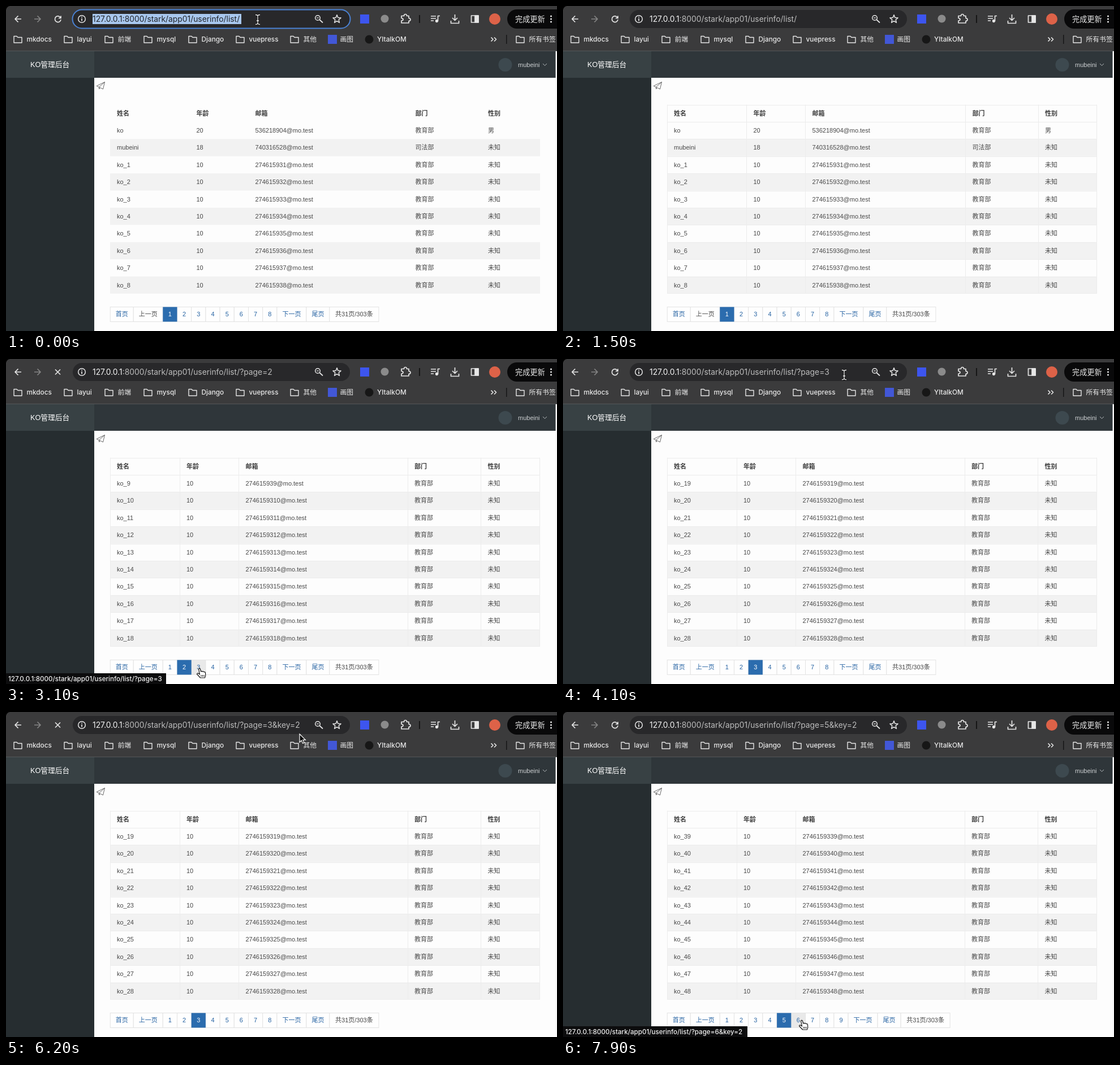
An HTML page that plays this animation: 974 px wide and 575 px high, repeating every 8 s.

```html
<!DOCTYPE html>
<html lang="zh-CN">
<head>
<meta charset="utf-8">
<title>Paged user list</title>
<style>
html, body { margin: 0; width: 100%; height: 100%; overflow: hidden; background: #fdfdfd; }
svg { display: block; width: 974px; height: 575px; }
text { font: 11px "Liberation Sans", "Noto Sans CJK SC", "Noto Sans CJK", sans-serif; fill: #484848; white-space: pre; }
.ui text { font: 500 11.8px Inter, "Noto Sans CJK SC", "Noto Sans CJK", sans-serif; fill: #e9e9e9; }
.ui .url { font-size: 13.85px; font-weight: 400; fill: #bdbdbd; }
.ui .url tspan { fill: #f4f4f4; }
.ui .picked, .ui .picked tspan { fill: #20242a; }
.ui .status { font-size: 11.6px; fill: #f2f2f2; }
.icon { fill: none; stroke: #e6e6e6; stroke-width: 1.7; stroke-linejoin: round; }
.head { font-weight: bold; fill: #3c3c3c; }
.mid { text-anchor: middle; }
.link { fill: #2562a2; }
.line { fill: none; stroke: #ececec; }
</style>
</head>
<body>
<svg viewBox="0 0 974 575">
  <rect width="974" height="80" fill="#3b3b3c"/>
  <path d="M0 0H7Q1 1 0 7Z"/>
  <rect y="79" width="974" height="1.5" fill="#555759"/>

  <g class="ui">
    <g class="icon">
      <path d="M27 23H16.500M21.500 17.500L16 23L21.500 28.500"/>
      <path d="M50 23H60.500M55.500 17.500L61 23L55.500 28.500" stroke="#858585"/>
    </g>
    <rect x="118" y="7" width="490" height="32" rx="16" fill="#28282a"/>
    <g id="bar"></g>
    <g class="icon">
      <circle cx="134" cy="23" r="6.300" stroke-width="1.500"/>
      <path d="M134 22V26.500M134 19V20.500"/>
      <circle cx="551" cy="21" r="4.300" stroke-width="1.500"/>
      <path d="M549 21H553" stroke-width="1.200"/>
      <path d="M554 24L560 29.500"/>
      <path id="star" stroke-width="1.500"/>
      <path d="M699 17.500H703.500Q703.500 14.500 706 14.500T708.500 17.500H712V21.500Q715 21.500 715 24T712 26.500V30H699V26Q702 26 702 23.800T699 21.500Z"/>
      <path d="M751 18H760M751 22H760M751 26H756M763.500 27V17.500H767"/>
      <circle cx="761.500" cy="26.500" r="1.800" fill="#e6e6e6"/>
      <path d="M793.500 15V25M789 21L793.500 25.500L798 21M786.500 26V30.500H800.500V26"/>
      <rect x="822.500" y="17" width="12.500" height="12"/>
      <path d="M829 17H835V29H829Z" fill="#e6e6e6"/>
      <path d="M857.500 55.500L861 59L857.500 62.500M863 55.500L866.500 59L863 62.500"/>
    </g>
    <rect x="626" y="15" width="16" height="16" fill="#3d55ee"/>
    <circle cx="669.500" cy="22.500" r="7" fill="#8b8b8b"/>
    <path d="M730 16h2v14h-2zM884 51h1.500v16h-1.500z" fill="#161616"/>
    <circle cx="864" cy="23" r="10" fill="#dd6248"/>
    <rect x="886" y="6" width="110" height="34" rx="17" fill="#09090a"/>
    <text x="900" y="28" style="font-size:13.200px">完成更新</text>
    <g fill="#eee"><circle cx="963.500" cy="18" r="1.500"/><circle cx="963.500" cy="23" r="1.500"/><circle cx="963.500" cy="28" r="1.500"/></g>
    <g id="marks"></g>
    <rect x="569" y="51" width="16" height="16" fill="#4257d6"/>
    <text x="590.500" y="63.300">画图</text>
    <circle cx="642" cy="59" r="7.500" fill="#171717"/>
    <text x="656" y="63.300">YItalkOM</text>
  </g>

  <rect y="80" width="974" height="47" fill="#2f363a"/>
  <rect y="80" width="156" height="47" fill="#384144"/>
  <rect y="127" width="156" height="448" fill="#262d30"/>
  <rect x="971.500" y="80" width="3" height="495" fill="#f6f6f6"/>
  <text x="43" y="108" style="font-size:12.700px;fill:#fff">KO管理后台</text>
  <circle cx="882.500" cy="104" r="12" fill="#3d494f"/>
  <text x="905" y="107.500" style="fill:#cdd0d2">mubeini</text>
  <path d="M949 102L952.500 105.500L956 102" fill="none" stroke="#b5babd"/>
  <path d="M160 141.500L174.500 134.500L171.500 147L166.500 144.500ZM174.500 134.500L164.500 143.500V147L166.500 144.500" fill="none" stroke="#686868"/>

  <g id="page"></g>
  <g id="status" class="ui"></g>
  <g id="cursor"></g>
</svg>
<script>
const $ = id => document.getElementById(id);
const PREFIX = '27461593', MAIL = '@mo.test', LIST = '/stark/app01/userinfo/list/';
const ROW = 30.4, TOP = 174.5;

const text = (x, y, s, cls = '') => `<text x="${x}" y="${y}" class="${cls}">${s}</text>`;
const rect = (x, y, w, h, attrs) => `<rect x="${x}" y="${y}" width="${w}" height="${h}" ${attrs}/>`;

$('star').setAttribute('d', 'M' + Array.from({ length: 10 }, (_, i) => {
  const a = (i / 5 - .5) * Math.PI, r = i % 2 ? 3.3 : 7.5;
  return [585 + r * Math.cos(a), 23.3 + r * Math.sin(a)].map(v => v.toFixed(1));
}).join('L') + 'Z');

$('marks').innerHTML = [[13, 'mkdocs'], [102, 'layui'], [174, '前端'], [243, 'mysql'], [322, 'Django'],
  [406, 'vuepress'], [502, '其他'], [901, '所有书签']].map(([x, name]) =>
  `<path class="icon" style="stroke-width:1.4" d="M${x + 1} 53.500h5l2 2h7v9.500h-14z"/>` + text(x + 23.5, 63.3, name)).join('');

// Address and status texts
const query = (page, key) => (page > 1 ? '?page=' + page : '') + key;
const address = q => `:8000${LIST}${q}`.replace('&', '&amp;');

function bar({ page, key, ring, picked, busy }) {
  const reload = busy ? 'M87 18.500L96 27.500M96 18.500L87 27.500'
    : 'M96.300 20.500A5.300 5.300 0 1 0 97 24M97 17.500V21.500H93';
  return `<path class="icon" d="${reload}"/>` +
    (ring ? rect(117.5, 6.5, 491, 33, 'rx="16.5" fill="none" stroke="#4a82d4" stroke-width="2"') : '') +
    (picked ? rect(153, 14, 263 + (page > 1 ? 57 : 0), 18, 'fill="#a8c7ee"') : '') +
    text(153, 28, `<tspan>127.0.0.1</tspan>${address(query(page, key))}`, 'url' + (picked ? ' picked' : ''));
}

function status({ link, key }) {
  return link ? rect(0, 556, key ? 326 : 283, 19, 'fill="#0c0c0d"') +
    text(4, 570, '127.0.0.1' + address(query(link, key)), 'status') : '';
}

// Page content
function rowsOf(page) {
  const first = page * 10 - 11;
  return Array.from({ length: 10 }, (_, i) => {
    const n = first + i;
    if (n === -1) return ['ko', 20, '536218904' + MAIL, '教育部', '男'];
    if (n === 0) return ['mubeini', 18, '740316528' + MAIL, '司法部', '未知'];
    return ['ko_' + n, 10, PREFIX + n + MAIL, '教育部', '未知'];
  });
}

function table(page, lines) {
  const cols = page === 1 ? [184, 324.5, 428.5, 711.5, 840] : [184, 307, 411.5, 710, 839.5];
  const rows = [['姓名', '年龄', '邮箱', '部门', '性别'], ...rowsOf(page)];
  let out = '', path = '';
  rows.forEach((row, r) => {
    const y = TOP + r * ROW;
    if (r && r % 2 === 0) out += rect(184, y, 760, ROW, 'fill="#f2f2f2"');
    row.forEach((s, c) => out += text(cols[c] + 12, (y + 19.1).toFixed(1), s, r ? '' : 'head'));
    path += `M184 ${Math.round(y) + .5}H944`;
  });
  cols.forEach(x => path += `M${Math.floor(x) + .5} 174.500V509`);
  path += 'M943.500 174.500V509M184 508.500H944';
  return out + (lines ? `<path class="line" d="${path}"/>` : '');
}

function pager(page, hover) {
  const cells = [['首页', 41], ['上一页', 52]];
  for (let n = 1; n <= Math.max(8, page + 4); n++) cells.push([n, 25.2]);
  cells.push(['下一页', 52], ['尾页', 41], ['共31页/303条', 87]);
  let x = 184.3, boxes = '', labels = '', active = '';
  cells.forEach(([s, w], i) => {
    const on = s === page, dull = i === cells.length - 1 || (i === 1 && page === 1);
    const left = x.toFixed(1);
    boxes += rect(left, 532.5, w, 26, `fill="${s === hover ? '#e9e9e9' : '#fefefe'}" stroke="#e3e3e3"`);
    if (on) active = rect(left, 532.5, w, 26, 'fill="#2b6cae"');
    labels += `<text x="${(x + w / 2).toFixed(1)}" y="549.300" class="mid${dull ? '' : ' link'}"${on ? ' style="fill:#fff"' : ''}>${s}</text>`;
    x += w;
  });
  return boxes + active + labels;
}

// Pointer
const BEAM = 'M-4 -8.500Q0 -8.500 0 -6Q0 -8.500 4 -8.500M0 -6V6M-4 8.500Q0 8.500 0 6Q0 8.500 4 8.500M-2 2H2';
const SHAPES = {
  beam: `<path d="${BEAM}" fill="none" stroke="#111" stroke-width="3"/><path d="${BEAM}" fill="none" stroke="#eee" stroke-width="1.300"/>`,
  arrow: '<path d="M0 0V14.500L3.300 11.300L5.500 16.500L8 15.400L5.800 10.300H10.300Z" fill="#0b0b0b" stroke="#fff" stroke-width="1.200"/>',
  hand: '<path d="M-1.500 1.500Q0 -.800 1.500 1.500L2.500 6Q4 4.500 5.300 6.200Q7 5 8 6.800Q10 6 10.500 8.500Q11.500 13 9.500 17H1.500Q-1 14 -4.500 10.500Q-4 8 -1.500 9.500L.500 11Z" fill="#fff" stroke="#111" stroke-width="1.200" stroke-linejoin="round"/>' +
    '<path d="M3 12V15M5.500 12V15M8 12V15" stroke="#111"/>'
};
const PATH = [[0, 445, 24], [1500, 445, 24], [1900, 317, 547], [2600, 317, 547], [2800, 342, 547], [3500, 342, 547],
  [4000, 497, 28], [4600, 497, 28], [4800, 515, 27], [5500, 515, 27], [6200, 519, 39], [6400, 519, 40],
  [7300, 392, 546], [7600, 392, 546], [7800, 422, 545], [8000, 422, 545]];

function pointer(t) {
  const i = PATH.findIndex(p => p[0] > t), [t0, x0, y0] = PATH[i - 1], [t1, x1, y1] = PATH[i];
  const u = (t - t0) / (t1 - t0), k = u * u * (3 - 2 * u);
  return [x0 + (x1 - x0) * k, y0 + (y1 - y0) * k];
}

const within = (t, ...spans) => spans.some(([a, b]) => t >= a && t < b);

function stateAt(t) {
  const [x, y] = pointer(t);
  const over = y > 532 && y < 559;
  return {
    x, y, over,
    page: t < 2500 ? 1 : t < 3300 ? 2 : t < 7600 ? 3 : 5,
    link: over ? Math.floor((x - 277.3) / 25.2) + 1 : 0,
    key: '&key=2'.slice(0, Math.max(0, Math.floor((t - 5400) / 100))),
    ring: within(t, [0, 500], [4600, 6100]),
    picked: within(t, [0, 500], [4600, 4900]),
    busy: within(t, [500, 800], [2200, 2500], [3000, 3300], [6100, 6300], [7400, 7600]),
    lines: t >= 500,
    hidden: within(t, [400, 1600])
  };
}

const shown = {};
function put(id, html) {
  if (shown[id] !== html) $(id).innerHTML = shown[id] = html;
}

function draw() {
  const t = Math.floor(performance.now() % 8000 / 100) * 100, s = stateAt(t);
  put('bar', bar(s));
  put('page', table(s.page, s.lines) + pager(s.page, s.link));
  put('status', status(s));
  put('cursor', s.hidden ? '' : SHAPES[s.over ? 'hand' : s.y < 40 && t < 4700 ? 'beam' : 'arrow']);
  $('cursor').setAttribute('transform', `translate(${s.x} ${s.y})`);
  requestAnimationFrame(draw);
}
draw();
</script>
</body>
</html>
```
